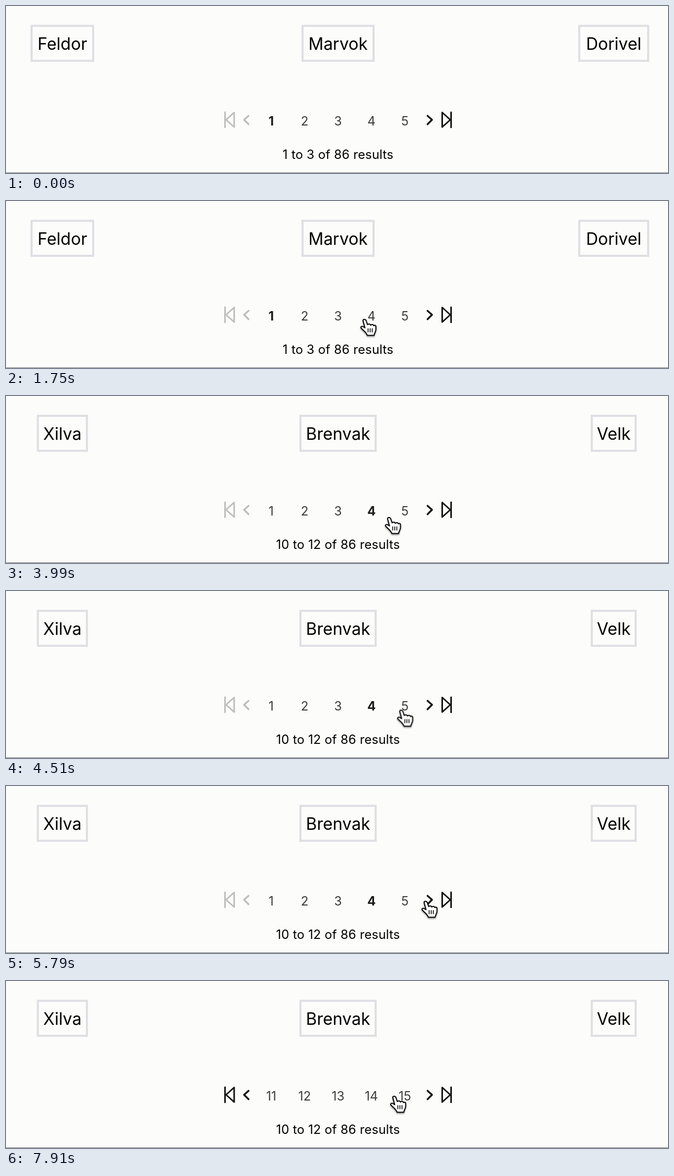
An HTML page for the animation above (8000 ms loop, 1268 by 320 pixels).

```html
<!DOCTYPE html>
<html lang="en">
<head>
<meta charset="utf-8">
<title>Pagination</title>
<style>
  html, body { margin: 0; width: 100%; height: 100%; overflow: hidden; background: #fcfcfb; }
  svg { display: block; width: 1268px; height: 320px; }
  text { font-family: Inter, "Open Sans", sans-serif; text-anchor: middle; }
  .names { font-size: 32px; fill: #000; }
  .names rect { fill: none; stroke: #dfdfe5; stroke-width: 4; }
  .pages { font-size: 24px; fill: #3c3c3c; }
  .pages .on { font-weight: 700; fill: #1c1c1c; }
  .results { font-size: 24px; fill: #000; letter-spacing: .15px; }
  .icon { fill: none; stroke: #141414; stroke-width: 3; stroke-linecap: round; stroke-linejoin: round; }
  .chevron { stroke-width: 3.6; }
  .off { stroke: #bebebe; }

  /* Page states switch hard at each click */
  .s1, .s2, .s3, .s4, .before, .after, .first, .later, .arrow, .hand {
    animation: 8s step-end infinite;
  }
  .s1, .before { animation-name: untilPick; }
  .after { animation-name: fromPick; }
  .s2 { animation-name: picked; }
  .s3 { animation-name: next1; }
  .s4 { animation-name: next2; }
  .first { animation-name: untilNext; }
  .later { animation-name: fromNext; }
  .arrow { animation-name: untilHover; }
  .hand { animation-name: fromHover; }
  @keyframes untilPick { 0% { visibility: visible } 34.5%, 100% { visibility: hidden } }
  @keyframes fromPick { 0% { visibility: hidden } 34.5%, 100% { visibility: visible } }
  @keyframes picked { 0% { visibility: hidden } 34.5% { visibility: visible } 74%, 100% { visibility: hidden } }
  @keyframes next1 { 0% { visibility: hidden } 74% { visibility: visible } 90.5%, 100% { visibility: hidden } }
  @keyframes next2 { 0% { visibility: hidden } 90.5%, 100% { visibility: visible } }
  @keyframes untilNext { 0% { visibility: visible } 74%, 100% { visibility: hidden } }
  @keyframes fromNext { 0% { visibility: hidden } 74%, 100% { visibility: visible } }
  @keyframes untilHover { 0% { visibility: visible } 17%, 100% { visibility: hidden } }
  @keyframes fromHover { 0% { visibility: hidden } 17%, 100% { visibility: visible } }

  .cursor { animation: move 8s linear infinite; filter: drop-shadow(0 2px 1.5px #0006); }
  @keyframes move {
    0%, 9% { transform: translate(664px, 326px); animation-timing-function: ease-out }
    19.5% { transform: translate(686px, 229px) }
    21.875%, 27% { transform: translate(687px, 227px); animation-timing-function: ease-in-out }
    31%, 43.5% { transform: translate(692px, 229px); animation-timing-function: ease-in }
    49.875% { transform: translate(734px, 233px) }
    56% { transform: translate(756px, 229px) }
    62.125% { transform: translate(777px, 222px); animation-timing-function: ease-out }
    68%, 88.5% { transform: translate(804px, 221px); animation-timing-function: ease-in-out }
    93.5% { transform: translate(808px, 221px); animation-timing-function: ease-in-out }
    98.875%, 100% { transform: translate(744px, 221px) }
  }
</style>
</head>
<body>
<svg viewBox="0 0 1268 320">
  <defs>
    <g id="skip">
      <path d="M419.5 203.5V232.5M437 204V232L421.5 218Z"/>
      <path class="chevron" d="M464.5 210.5L456 218L464.5 226.5"/>
    </g>
  </defs>

  <g class="names before">
    <rect x="49" y="38" width="118" height="67"/><text x="108" y="84">Feldor</text>
    <rect x="568" y="38" width="136" height="67"/><text x="636" y="84">Marvok</text>
    <rect x="1098" y="38" width="132" height="67"/><text x="1164" y="84">Dorivel</text>
  </g>
  <g class="names after">
    <rect x="61" y="38" width="94" height="67"/><text x="108" y="84">Xilva</text>
    <rect x="564" y="38" width="144" height="67"/><text x="636" y="84">Brenvak</text>
    <rect x="1122" y="38" width="84" height="67"/><text x="1164" y="84">Velk</text>
  </g>

  <use href="#skip" class="icon off first"/>
  <use href="#skip" class="icon later"/>
  <g class="icon">
    <path class="chevron" d="M807.5 210.5L816 218L807.5 226.5"/>
    <path d="M852.5 203.5V232.5M835.5 204V232L851 218Z"/>
  </g>

  <g class="pages">
    <text class="s1" y="229"><tspan class="on" x="508">1</tspan><tspan x="572">2</tspan><tspan x="636">3</tspan><tspan x="700">4</tspan><tspan x="764">5</tspan></text>
    <text class="s2" y="229"><tspan x="508">1</tspan><tspan x="572">2</tspan><tspan x="636">3</tspan><tspan class="on" x="700">4</tspan><tspan x="764">5</tspan></text>
    <text class="s3" y="229"><tspan x="508">6</tspan><tspan x="572">7</tspan><tspan x="636">8</tspan><tspan x="700">9</tspan><tspan x="764">10</tspan></text>
    <text class="s4" y="229"><tspan x="508">11</tspan><tspan x="572">12</tspan><tspan x="636">13</tspan><tspan x="700">14</tspan><tspan x="764">15</tspan></text>
  </g>

  <g class="results">
    <text class="before" x="636" y="293">1 to 3 of 86 results</text>
    <text class="after" x="636" y="293">10 to 12 of 86 results</text>
  </g>
  <rect y="319" width="1268" height="1" fill="#747474"/>

  <g class="cursor">
    <path class="arrow" d="M0 0V23L5.5 18L9.5 27L13.5 25L9.5 16.5H17Z" fill="#000" stroke="#fff" stroke-width="2"/>
    <g class="hand" stroke="#000" stroke-width="2" stroke-linejoin="round" stroke-linecap="round">
      <path fill="#fff" d="M-3 3C-4 0 0 -1.5 2.5 1.5L5.5 10C7 8 11 8.5 11.5 11C13 9 17 9.5 17.5 12C19 10.5 22 11.5 21.5 14V20C21 24 18.5 26 18 30.5H5C4 26 -1 22 -6 17.5C-9 15 -6 12.5 -3.5 13.5L.5 16Z"/>
      <path fill="none" stroke-width="1.6" d="M6.5 17.5V24M10.5 17.5V24M14.5 17.5V24"/>
    </g>
  </g>
</svg>
</body>
</html>
```
